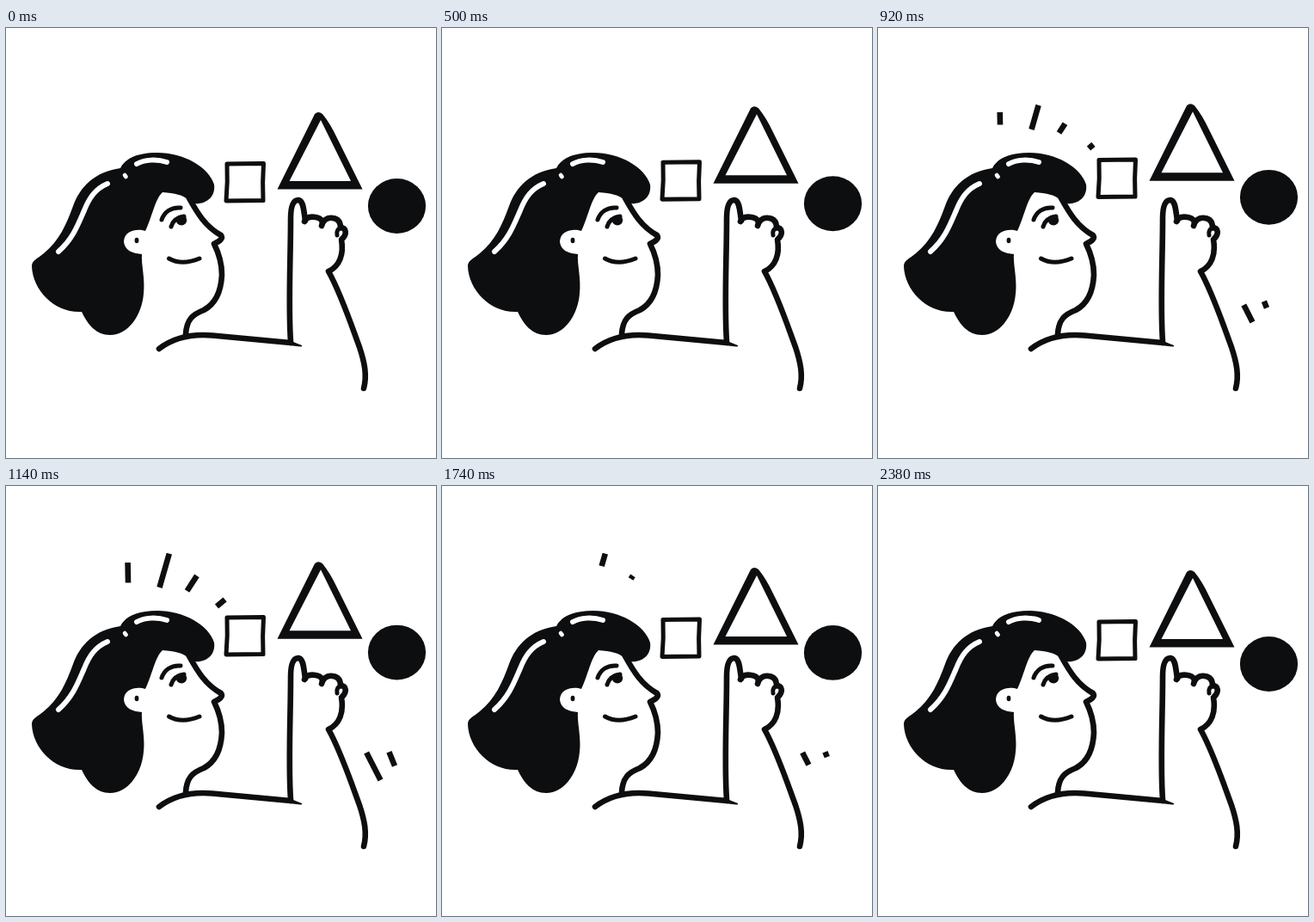
These frames come from a looping animation (500x500 px, 2400 ms). An HTML page:

```html
<!DOCTYPE html>
<html lang="en">
<head>
<meta charset="utf-8">
<title>Pointing at shapes</title>
<style>
  html, body { margin: 0; width: 100%; height: 100%; overflow: hidden; background: #fff; }
  svg { display: block; width: 100%; height: 100%; }
  .ink { fill: #0d0e10; }
  .pen { fill: none; stroke: #0d0e10; stroke-width: 6.6; stroke-linecap: round; stroke-linejoin: round; }
  .fine { stroke-width: 5; }
  .shine { fill: none; stroke: #fff; stroke-width: 6; stroke-linecap: round; }
  .ray { stroke: #0d0e10; stroke-width: 6.6; }
</style>
</head>
<body>
<svg viewBox="0 0 500 500">
  <!-- hair -->
  <path class="ink" d="M30 277 C30 270 37 268 44 262 C62 247 70 229 78 207 C86 185 103 167 133 163 C138 153 150 145 176 145 C207 145 236 162 242 182 C244 197 232 206 217 204 L212 200 C206 194 196 192 182 191 C173 199 170 220 162 236 C153 233 138 235 137 248 C138 260 149 262 158 263 C157 275 162 291 160 309 C158 334 142 357 121 357 C105 357 95 345 88 330 C58 332 31 306 30 277 Z"/>
  <path class="shine" d="M61 260 C78 245 84 228 91 212 C97 197 104 187 118 181"/>
  <path class="shine" d="M152 158 C161 153 175 152 187 156"/>
  <path class="shine" d="M138 171 L139.500 173" style="stroke-width:4.600"/>
  <ellipse class="ink" cx="152" cy="247" rx="2.400" ry="3.200"/>

  <!-- face -->
  <path class="pen" d="M213 198 C223 216 232 231 250 241 C253 245 248 248 242 251 C248 263 251 275 251 287 C250 308 243 321 230 328 C217 333 210 339 209 356"/>
  <path class="pen fine" d="M181 223 C184 214 192 208 203 209"/>
  <path class="pen fine" d="M192 231 C194 224 200 220 207 219"/>
  <ellipse class="ink" cx="204" cy="223.500" rx="6.200" ry="6"/>
  <path class="pen fine" d="M189.500 268 C200 274 213 273 225 268"/>

  <!-- shoulder, arm, hand -->
  <path class="pen" d="M178 373 C191 363 211 355 240 357.500 L331 366"/>
  <path class="ink" d="M329 363 L344 369 Q345 371 342 370.500 L329 369 Z"/>
  <path class="pen" d="M331 365 C328 322 331 268 331 222 C331 207 334 200 340 200 C346 201 346 211 348 224"/>
  <path class="pen" d="M347 225 C349 220 354 219 360 220 C367 221 369 225 367 230 C369 223 374 220 380 221 C387 222 389 227 389 232 C396 232 397 240 390 246 C393 263 388 277 375 283 C389 308 400 341 411 371 C417 389 420 404 416 419"/>
  <path class="pen fine" d="M390 233 C386 233 384 236 385 241"/>

  <!-- floating shapes -->
  <path id="square" class="pen fine" d="M257 158 L299.500 157.500 Q298 180 299 200.500 L256 201 Q258 179 257 158 Z"/>
  <path id="triangle" class="ink" fill-rule="evenodd" d="M315.500 187.500 L359 100 Q363 96 368 100 Q377 111 385 128 L414.500 187.500 Z M329.500 178 L401 178 L366 107 Z"/>
  <ellipse id="circle" class="ink" cx="454.500" cy="207" rx="33.600" ry="31.900"/>
  <g id="rays"></g>
</svg>
<script>
const LOOP = 2400, FULL = 1060;
const byId = id => document.getElementById(id);
const clamp = v => Math.max(0, Math.min(1, v));
const span = (t, a, b) => clamp((t - a) / (b - a));
const smooth = u => (1 - Math.cos(Math.PI * u)) / 2;
const easeOut = u => Math.sin(Math.PI / 2 * u);

// each shape rises, then sinks back, one after another
const floats = [
  { el: byId("triangle"), height: 10, up: [0, 1050], down: [1050, 2160], ease: easeOut },
  { el: byId("square"), height: 5, up: [50, 1150], down: [1150, 2350], ease: smooth },
  { el: byId("circle"), height: 15, up: [150, 1400], down: [1540, 2400], ease: smooth }
];

const rays = [];

// rays: x, y of the inner end, length, time it starts to leave
function fan(angle, step, delay, list) {
  list.forEach(([x, y, len, leave], i) => {
    const el = document.createElementNS("http://www.w3.org/2000/svg", "line");
    el.setAttribute("class", "ray");
    byId("rays").appendChild(el);
    const a = (angle + step * i) * Math.PI / 180;
    rays.push({
      el, x, y, leave,
      dx: len * Math.cos(a),
      dy: len * Math.sin(a),
      start: 750 + delay - 180 * (len / 41) ** 2,
      gone: leave + 200 + 11 * len
    });
  });
}

fan(-91, 17, 0, [
  [142, 112.5, 23.5, 1250],
  [178.5, 118, 41, 1330],
  [210.5, 122, 21, 1400],
  [245, 140, 12.5, 1170]
]);
fan(-117, 5, 80, [
  [435.5, 342, 36, 1410],
  [452, 325.5, 17.5, 1490]
]);

function draw(t) {
  for (const { el, height, up, down, ease } of floats) {
    const lift = height * (ease(span(t, ...up)) - smooth(span(t, ...down)));
    el.setAttribute("transform", `translate(0 ${-lift.toFixed(2)})`);
  }
  for (const { el, x, y, dx, dy, start, leave, gone } of rays) {
    const head = span(t, start, FULL), tail = span(t, leave, gone);
    el.setAttribute("visibility", head > tail ? "visible" : "hidden");
    el.setAttribute("x1", x + dx * tail);
    el.setAttribute("y1", y + dy * tail);
    el.setAttribute("x2", x + dx * head);
    el.setAttribute("y2", y + dy * head);
  }
}

const begin = performance.now();
function tick() {
  draw((performance.now() - begin) % LOOP);
  requestAnimationFrame(tick);
}
tick();
</script>
</body>
</html>
```
